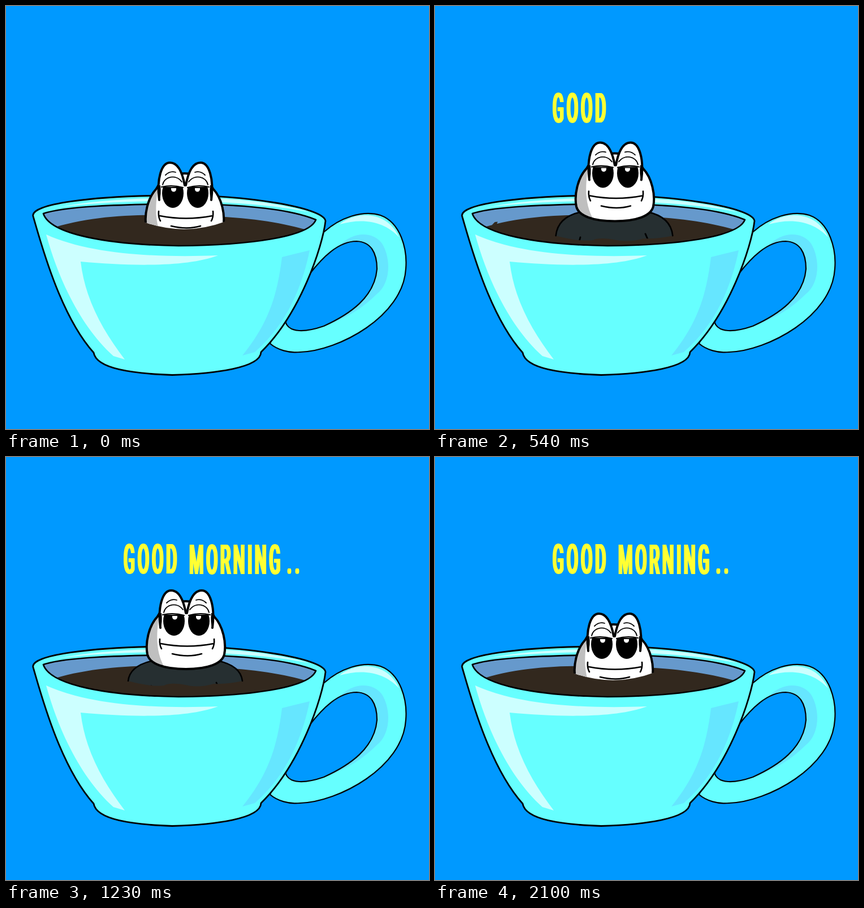
Animation of 748 by 748 pixels, one loop 2.13 s. Source, as an HTML page:

```html
<!DOCTYPE html>
<html lang="en">
<head>
<meta charset="utf-8">
<title>Good morning</title>
<style>
html, body { margin: 0; width: 100%; height: 100%; overflow: hidden; background: #0099ff; }
svg { position: absolute; left: 0; top: 0; display: block; }
.word {
  position: absolute; top: 145px; white-space: pre; color: #ffff33;
  font: 500 73px/1 Roboto, "Liberation Sans", sans-serif; letter-spacing: 11.5px;
  transform: scaleX(.4); transform-origin: 0 0; opacity: 0;
  text-shadow: -4px 0, -2px 0, 2px 0, 4px 0;
}
.line { fill: none; stroke: #000; stroke-linecap: round; stroke-linejoin: round; }
.pale { fill: #ccffff; }
.shade { fill: #66e6ff; }
</style>
</head>
<body>
<svg width="748" height="748" viewBox="0 0 748 748">
  <defs>
    <path id="opening" d="M66 367C105 354 200 351 300 350C410 350 500 358 548 378C536 409 428 423 305 424C180 422 78 404 66 367Z"/>
    <path id="skull" d="M268 268C252 285 246 315 250 335C254 352 280 361 318 361C356 361 382 352 386 335C390 315 384 285 368 268C350 232 286 232 268 268Z"/>
    <clipPath id="inCup"><use href="#opening"/></clipPath>
    <clipPath id="inSkull"><use href="#skull"/></clipPath>
    <clipPath id="aboveCoffee"><path d="M0 0H748V381H388Q316 408 244 382H0Z"/></clipPath>
    <clipPath id="underLid"><rect id="lidBox" x="260" y="265" width="120" height="60"/></clipPath>
    <clipPath id="inBody"><path id="bodyClip"/></clipPath>

    <g id="ear">
      <path d="M273 288C268 250 277 222 292 222C306 222 314 240 318 262" fill="#fff" stroke="#000" stroke-width="4" stroke-linecap="round"/>
      <path d="M271 262Q270 278 273 290Q277 278 275 262Z"/>
    </g>
    <g id="lid">
      <path class="line" stroke-width="2.2" d="M277 265Q296 261 315 266"/>
      <path class="line" stroke-width="1.8" d="M279 261C282 246 303 242 313 256M284 244Q292 236 302 239"/>
    </g>
    <ellipse id="pupil" cx="297" cy="276" rx="19" ry="26"/>
    <g id="shut" class="line">
      <path stroke-width="2" d="M284 289C277 275 279 242 297 240C315 240 319 273 311 289"/>
      <path stroke-width="1.8" d="M277 283C273 257 279 238 294 236"/>
      <path stroke-width="2.2" d="M287 287Q298 293 308 287"/>
      <path stroke-width="3.2" d="M284 291Q297 304 312 293"/>
    </g>
  </defs>

  <g stroke="#000" stroke-width="2.2" stroke-linejoin="round">
    <path fill="#66ffff" d="M540 410L563 399C590 375 630 360 662 370C698 383 710 430 707 465C702 549 588 610 520 612C500 614 480 608 467 597Z"/>
    <path class="pale" stroke="none" d="M590 386C620 361 675 363 695 409C670 381 632 374 590 386Z"/>
    <path class="shade" stroke="none" d="M590 424C610 400 648 396 665 420C681 446 681 490 655 510Q620 545 572 562Z"/>
    <path fill="#0099ff" d="M536 475C560 444 588 416 620 416C645 417 656 436 656 465C652 515 608 545 562 566C530 577 500 579 494 558L480 520Z"/>
  </g>

  <path id="bowl" fill="#66ffff" stroke="#000" stroke-width="2.8" stroke-linejoin="round"
    d="M48 372C42 350 150 336 290 335C420 333 562 356 565 380C560 425 520 545 451 612C450 640 370 650 294 652.5C225 650 160 642 155 613C94 545 60 412 48 372Z"/>
  <path class="pale" d="M86 357C150 344 220 340 300 339C400 338 480 347 535 364C470 352 400 346 300 345C220 345 150 348 86 357Z"/>
  <path class="pale" d="M71 404C150 440 270 445 375 441C320 462 220 460 132 452C140 520 172 575 210 625L190 619C130 565 92 480 71 404Z"/>
  <path class="shade" d="M488 444L537 432C525 490 500 560 440 612L418 618C465 560 480 510 488 444Z"/>

  <use href="#opening" fill="#6699cc"/>
  <path id="coffee" fill="#32281e" clip-path="url(#inCup)"/>
  <use href="#opening" class="line" stroke-width="2.6"/>

  <path id="splash" fill="#32281e"/>

  <path id="body" fill="#262f31"/>
  <path id="shoulders" class="line" stroke-width="2.6"/>
  <g clip-path="url(#inBody)"><path id="creases" class="line" stroke-width="2.8" d="M257 45Q255 52 253 63M372 39L382 62"/></g>

  <g clip-path="url(#aboveCoffee)">
    <g id="head">
      <use href="#skull" fill="#fff"/>
      <path clip-path="url(#inSkull)" fill="#bfbfbf" d="M240 250H274C266 290 261 330 284 364H240Z"/>
      <use href="#skull" class="line" stroke-width="4"/>
      <use href="#ear"/>
      <use href="#ear" transform="translate(638) scale(-1 1)"/>
      <g id="awake">
        <g clip-path="url(#underLid)">
          <use href="#pupil"/>
          <use href="#pupil" transform="translate(638) scale(-1 1)"/>
        </g>
        <g id="lids">
          <use href="#lid"/>
          <use href="#lid" transform="translate(638) scale(-1 1)"/>
        </g>
        <path id="glints" fill="#fff" d="M294 267h9v2a4.5 4.5 0 0 1 -9 0ZM336 267h9v2a4.5 4.5 0 0 1 -9 0Z"/>
      </g>
      <g id="asleep">
        <use href="#shut"/>
        <use href="#shut" transform="translate(638) scale(-1 1)"/>
      </g>
      <path class="line" stroke-width="2.6" d="M274 316Q320 325 367 316M272 308Q271 318 275 325M368 308Q369 318 365 325M294 334Q322 341 346 334"/>
    </g>
  </g>
</svg>
<div class="word" style="left:208px;letter-spacing:12.5px">GOOD</div>
<div class="word" style="left:324px;top:146px">MORNING</div>
<div class="word" style="left:497px">.</div>
<div class="word" style="left:511px">.</div>

<script>
const LOOP = 2130, STEP = 30;
const $ = id => document.getElementById(id);
const words = document.querySelectorAll('.word');
const fades = [[240, 390], [600, 750], [960, 1050], [1110, 1200]];

// time, head drop, body half width, waterline, shoulder height
const poses = [
  [0, 55, 55, 378, 370],
  [30, 54, 56, 378, 370],
  [300, -3, 92, 406, 344],
  [390, 0, 96, 407, 346],
  [600, 24, 105, 406, 368],
  [690, 21, 105, 405, 366],
  [960, 8, 98, 398, 354],
  [1230, 14, 101, 396, 360],
  [1560, 16, 101, 401, 362],
  [1710, 6, 99, 400, 353],
  [1890, 20, 84, 394, 368],
  [2100, 55, 55, 378, 370]
];

// position reached 270 ms after launch, and size
const drops = [
  [152, 336, 5], [212, 337, 3], [455, 348, 4.5], [413, 354, 2.2],
  [205, 357, 1.2], [212, 363, 1.4], [209, 368, 1.2], [442, 360, 1.2]
];
const LAUNCH = 120, REACH = .27, FLIGHT = .42, PULL = 1200, SURFACE = 385;

const part = (t, a, b) => Math.max(0, Math.min(1, (t - a) / (b - a)));

function poseAt(t) {
  let i = poses.length - 2;
  while (i && poses[i][0] > t) i--;
  const a = poses[i], b = poses[i + 1];
  const k = (1 - Math.cos(Math.PI * part(t, a[0], b[0]))) / 2;
  return a.map((v, n) => v + (b[n] - v) * k);
}

function drawBody(half, water, top) {
  const x = u => 317 + u * half;
  const mid = water - (water - top) * .5;
  const arc = `M${x(-1)} ${water}C${x(-.98)} ${mid} ${x(-.84)} ${top + 6} ${x(-.56)} ${top}` +
    `L${x(.56)} ${top}C${x(.84)} ${top + 6} ${x(.98)} ${mid} ${x(1)} ${water}`;
  const hem = `Q${x(.75)} ${water + 6} ${x(.5)} ${water + 5}Q${x(.23)} ${water + 13} ${x(0)} ${water + 7}` +
    `Q${x(-.26)} ${water + 2} ${x(-.37)} ${water + 8}Q${x(-.6)} ${water + 11} ${x(-1)} ${water}Z`;
  $('body').setAttribute('d', arc + hem);
  $('bodyClip').setAttribute('d', arc + hem);
  $('shoulders').setAttribute('d', arc);
  $('creases').setAttribute('transform', `translate(0 ${top})`);
}

function splashPath(t) {
  const s = (t - LAUNCH) / 1000;
  if (s < 0 || s > FLIGHT) return '';
  let d = '';
  for (const [x, y, r] of drops) {
    const x0 = x < 317 ? 235 : 395;
    const rise = (SURFACE - y + PULL * REACH * REACH) / REACH;
    const px = x0 + (x - x0) * s / REACH, py = SURFACE - rise * s + PULL * s * s;
    if (py < SURFACE) d += `M${px - r} ${py + r * .5}l${r} ${-r}l${r} ${-r * .1}l${-r * .4} ${r}Z`;
  }
  const lift = 12 * Math.sin(Math.PI * s / FLIGHT);
  for (const x of [203, 429])
    d += `M${x} 375l3 ${-lift}l4 ${lift * .6}l5 ${-lift * .8}l2 ${lift * .5}l3 ${-lift * .3}l1 ${lift}Z`;
  return d;
}

function draw(t) {
  const [, drop, half, water, top] = poseAt(t);
  drawBody(half, water, top);
  const shift = -2 * part(drop, 18, 55);
  $('head').setAttribute('transform', `translate(${shift} ${drop})`);

  const shut = part(t, 270, 330) * (1 - part(t, 450, 510));
  $('lidBox').setAttribute('y', 265 + 36 * shut);
  $('lids').setAttribute('transform', `translate(0 ${20 * shut})`);
  $('glints').style.display = shut > 0 ? 'none' : '';
  $('awake').style.display = shut < 1 ? '' : 'none';
  $('asleep').style.display = shut < 1 ? 'none' : '';

  const wave = Math.sin(t / LOOP * Math.PI * 8) * .8;
  $('coffee').setAttribute('d', `M78 394C150 ${369 + wave} 250 ${367 - wave} 320 371C420 ${371 + wave} 490 ${383 - wave} 538 398V430H70Z`);
  $('splash').setAttribute('d', splashPath(t));
  words.forEach((w, i) => w.style.opacity = part(t, ...fades[i]));
}

const start = performance.now();
function tick(now) {
  const t = Math.max(0, now - start) % LOOP;
  draw(Math.floor(t / STEP) * STEP);
  requestAnimationFrame(tick);
}
draw(0);
requestAnimationFrame(tick);
</script>
</body>
</html>
```
